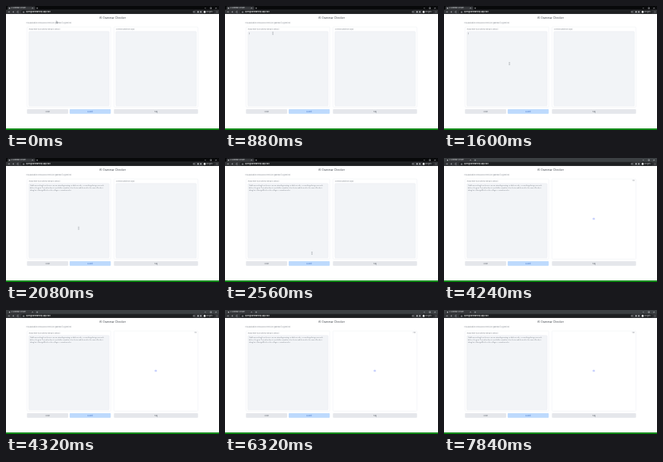
Write an HTML page that moves like this. It is 267x155 px and loops after 8000 ms.

```html
<!DOCTYPE html>
<html lang="en">
<head>
<meta charset="utf-8">
<title>AI Grammar Checker</title>
<style>
html, body { margin: 0; width: 100%; height: 100%; overflow: hidden; background: #fff; }
svg { display: block; width: 100vw; height: 100vh; }
text { font-family: Inter, "Open Sans", sans-serif; font-size: 1.85px; fill: #858a92; }
.mid { text-anchor: middle; }
.title { font-size: 3.35px; fill: #464b52; }
.chrome text { fill: #dfe1e5; }
.chrome .url { font-size: 2.4px; font-weight: 500; fill: #fff; }
.icon { fill: none; stroke: #d0d3d8; stroke-width: .45; }
.panel { fill: #fff; stroke: #e8ebef; stroke-width: .4; }
.field { fill: #f2f4f7; stroke: #e6e9ee; stroke-width: .4; }
.button { fill: #e5e7eb; }
.button.main { fill: #bddafd; }
.button + text { font-size: 2.1px; fill: #646b75; }
.button.main + text { fill: #4c7bcb; }
.entry text { font-size: 1.79px; fill: #747a82; }

.strip, .entry, .caret, .output, .busy, .beam, .arrow { animation: 8s step-end infinite; }
.strip { animation-name: strip; }
.entry { animation-name: entry; }
.caret { animation-name: caret; }
.output { animation-name: output; }
.busy { animation-name: busy; }
.beam { animation-name: beam; }
.arrow { animation-name: arrow; }
.pointer { animation: move 8s linear infinite; }
.spin { animation: spin 8s step-end infinite; transform-origin: 187.8px 76px; }

@keyframes strip { 0% { fill: #08090a } 53% { fill: #3c4043 } }
@keyframes entry { 0% { opacity: 0 } 24% { opacity: 1 } }
@keyframes caret { 0% { opacity: 0 } 11% { opacity: 1 } 24% { opacity: 0 } }
@keyframes output { 0% { opacity: 1 } 38% { opacity: 0 } }
@keyframes busy { 0% { opacity: 0 } 38% { opacity: 1 } }
@keyframes beam { 0% { opacity: 0 } 9% { opacity: 1 } 34% { opacity: 0 } }
@keyframes arrow { 0% { opacity: 1 } 9% { opacity: 0 } 34% { opacity: 1 } 50% { opacity: 0 } }
@keyframes move {
  0%, 1% { transform: translate(64px, 20px) }
  5%, 8% { transform: translate(72px, 18px) }
  9%, 11% { transform: translate(60px, 34px) }
  13%, 15% { transform: translate(52px, 46px) }
  17% { transform: translate(70px, 98px) }
  20%, 23% { transform: translate(82px, 72px) }
  32%, 33% { transform: translate(109px, 119px) }
  35%, 38% { transform: translate(110px, 131px) }
  43%, 47% { transform: translate(202px, 98px) }
  50%, 100% { transform: translate(202px, 106px) }
}
@keyframes spin {
  0% { transform: none }
  39% { transform: rotate(45deg) }
  43% { transform: none }
  47% { transform: rotate(30deg) scale(.9) }
  50% { transform: none }
  57% { transform: rotate(45deg) }
  60% { transform: none }
  68% { transform: rotate(25deg) }
  71% { transform: rotate(50deg) }
  73% { transform: rotate(12deg) }
  77% { transform: rotate(25deg) scale(.9) }
  79% { transform: none }
  87% { transform: rotate(45deg) }
  89% { transform: none }
  96% { transform: rotate(30deg) }
  98% { transform: none }
}
</style>
</head>
<body>
<svg viewBox="0 0 267 155" preserveAspectRatio="none">
  <rect width="267" height="155" fill="#fff"/>

  <g class="chrome">
    <rect class="strip" width="267" height="5"/>
    <path d="M2 5V1.4Q2 .5 3 .5H35.6Q36.6 .5 36.6 1.4V5Z" fill="#35373a"/>
    <rect y="4.6" width="267" height="5.4" fill="#323437"/>
    <rect x="19" y="5.3" width="218" height="4.1" rx="2" fill="#1d1f21"/>
    <circle cx="4.4" cy="2.7" r=".8" fill="#d8dade"/>
    <text x="6.5" y="3.4">AI Grammar Checker</text>
    <text class="url" x="25" y="8.2">opengrammarhelp.app/run</text>
    <path class="icon" d="M32.6 2l1.3 1.3m0-1.3l-1.3 1.3M38.2 2.7h1.8m-.9-.9v1.8M249 2.7h1.6M256 1.9h1.5v1.5h-1.5zM262.4 1.9l1.6 1.6m0-1.6l-1.6 1.6M5 7.4H3m.8-.8l-.8.8.8.8M8 7.4h2m-.8-.8l.8.8-.8.8M15.8 6.8a1 1 0 1 0 .1 1.1M21.4 7h1.4v1.2h-1.4zM234.8 6.7h1.5v1.4h-1.5z"/>
    <path d="M240 6.5h1.5v1.8H240zM243.5 6.5h1.4v1.8h-1.4z" fill="#d7dade"/>
    <rect x="246.5" y="5.3" width="15" height="4.1" rx="2" fill="#1d1f21"/>
    <circle cx="249" cy="7.4" r="1.3" fill="#f1f3f4"/>
    <text x="251.2" y="8.1">Incognito</text>
    <path d="M264.5 6.3v.4m0 .5v.4m0 .5v.4" stroke="#dfe1e5" stroke-width=".5"/>
  </g>

  <text class="title mid" x="133.5" y="16.4">AI Grammar Checker</text>
  <text x="25.3" y="21.9">This application checks and corrects the grammar of a given text.</text>

  <rect class="panel" x="26.3" y="26.2" width="105" height="100.2" rx="1"/>
  <text x="28.7" y="30">Please enter your sentence below to check it</text>
  <rect class="field" x="28.7" y="31.8" width="100.5" height="93.2" rx="1"/>
  <path class="caret" d="M30.3 33.2v2.2" stroke="#777d85" stroke-width=".5"/>
  <g class="entry">
    <text x="30" y="35.3">I had been working from home so we are attending meeting our daily records, or something during some work</text>
    <text x="30" y="38.3">before of a great. From when they it is probable somewhat to be shorter and the work to the same office by it</text>
    <text x="30" y="41.3">taking but of being difficult on the college or somewhere else.</text>
  </g>

  <rect class="panel" x="135.3" y="26.2" width="105.4" height="100.2" rx="1"/>
  <g class="output">
    <text x="137.8" y="30">Corrected sentence output</text>
    <rect class="field" x="137.8" y="31.8" width="101" height="93.2" rx="1"/>
  </g>
  <g class="busy">
    <text id="timer" x="239.2" y="29" text-anchor="end"></text>
    <g class="spin" fill="#d3dbff" stroke="#a3b2f6" stroke-width=".3">
      <path d="M187.8 74.9l1.4.6-1.4.6-1.4-.6zM187.8 75.9l1.4.6-1.4.6-1.4-.6z"/>
    </g>
  </g>

  <rect class="button" x="26.3" y="129" width="51.6" height="5.8" rx=".8"/>
  <text class="mid" x="52.1" y="132.7">Clear</text>
  <rect class="button main" x="79.8" y="129" width="51.5" height="5.8" rx=".8"/>
  <text class="mid" x="105.5" y="132.7">Submit</text>
  <rect class="button" x="135.3" y="129" width="105.4" height="5.8" rx=".8"/>
  <text class="mid" x="188" y="132.7">Flag</text>

  <rect y="153" width="267" height="2" fill="#128a1a"/>

  <g class="pointer">
    <path class="beam" d="M-.6-1.4H.6M0-1.4V1.4M-.6 1.4H.6" fill="none" stroke="#70767e" stroke-width=".4"/>
    <path class="arrow" d="M-.8-1.4V1.2l.6-.5.5 1 .5-.2-.5-1h.8z" fill="#fff" stroke="#5a6068" stroke-width=".4"/>
  </g>
</svg>
<script>
const timer = document.getElementById("timer");
const clock = document.querySelector(".pointer").getAnimations()[0];
const start = 3040;
const ticks = [start, 3200, 3440, 3600, 3760, 4000, 4240, 4400, 4560, 4800,
  5440, 5680, 5840, 6720, 6960, 7120, 7680, 7840];

function draw() {
  const time = (clock.currentTime || 0) % 8000;
  const tick = ticks.filter(t => t <= time).pop() ?? start;
  timer.textContent = ((tick - start) / 1000).toFixed(1) + "s";
  requestAnimationFrame(draw);
}
draw();
</script>
</body>
</html>
```
